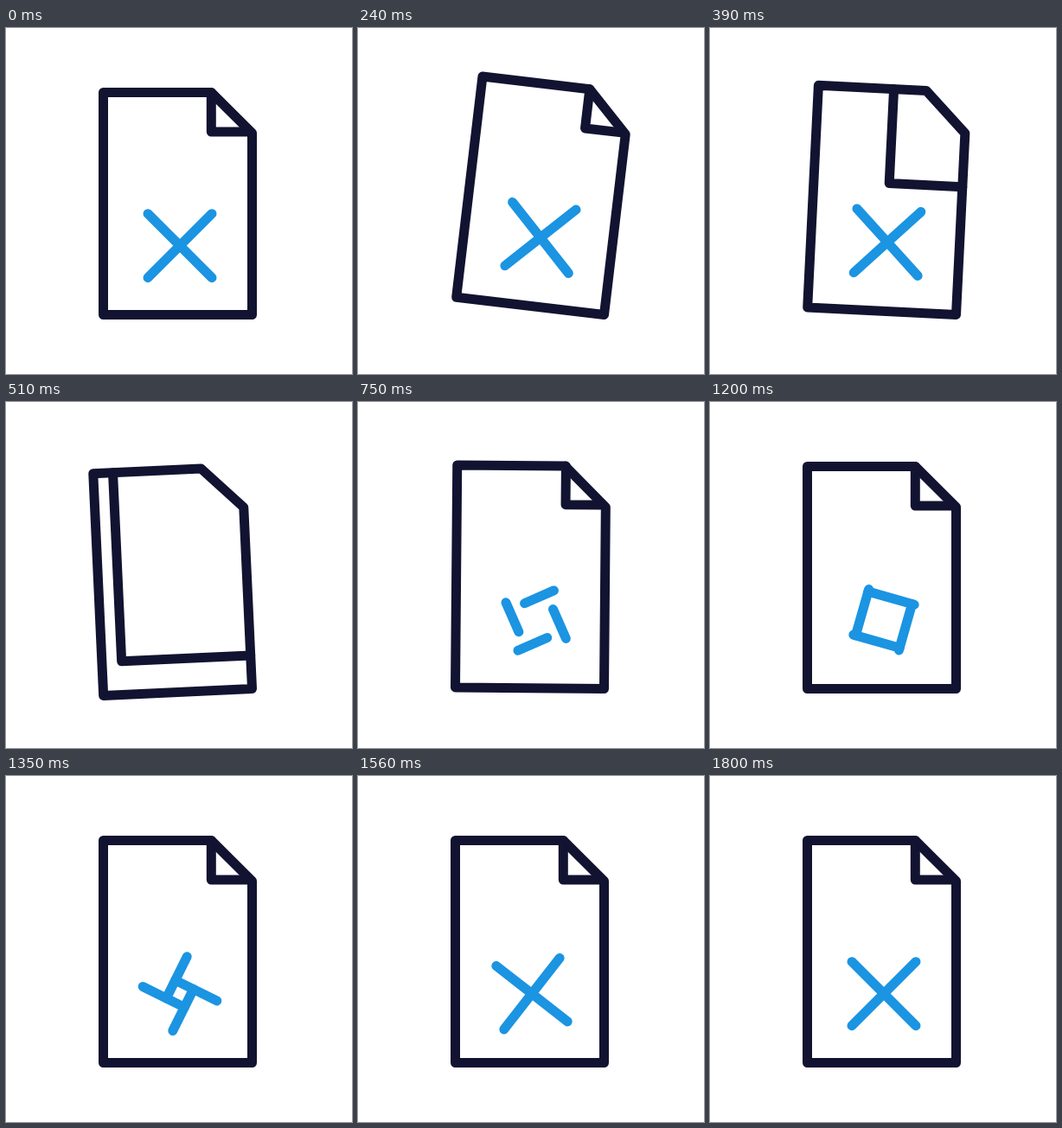
An HTML page with a canvas for the animation above (2.46 s loop, 400 px wide and 400 px high).

```html
<!DOCTYPE html>
<html>
<head>
<meta charset="utf-8">
<style>
html, body { margin: 0; width: 100%; height: 100%; overflow: hidden; background: #fff; }
canvas { display: block; width: 400px; height: 400px; }
</style>
</head>
<body>
<canvas id="stage" width="400" height="400"></canvas>
<script>
const ctx = document.getElementById('stage').getContext('2d');
const LOOP = 2460, STEP = 30, LAST = 60;
const DARK = '#121331', BLUE = '#1b94e2';
const L = 112.5, T = 74.5, R = 284.5, B = 331.5;   // page edges
const CUT_X = 237.3, CUT_Y = 121.5, FOLD_Y = 120;  // cut corner
const CX = 201, CY = 251.7, ARM = 52.3;

const clamp = v => Math.max(0, Math.min(1, v));
const smooth = v => { v = clamp(v); return v * v * (3 - 2 * v); };
const mix = (a, b, k) => a + (b - a) * k;

// Eased value list at step s; each key is [step, ...values]
function track(keys, s) {
  if (s <= keys[0][0]) return keys[0].slice(1);
  for (let i = 1; i < keys.length; i++) {
    const a = keys[i - 1], b = keys[i];
    if (s <= b[0]) {
      const k = smooth((s - a[0]) / (b[0] - a[0]));
      return a.slice(1).map((v, j) => mix(v, b[j + 1], k));
    }
  }
  return keys[keys.length - 1].slice(1);
}

const TILT = [[0, 0], [9, 7], [18, -3], [29, 2], [40, 0]];
// distance from centre, tail, head, drift x, drift y
const BARS = [
  [19, 22, 34, 34, 5, 2],
  [25, 23.4, -4, 33, 4, 1.6],
  [32, 27, -27, 28.5, 1, 0.4],
  [39, 27, -27, 28.5, 0, 0],
  [50, 0, 0, ARM, 0, 0]
];

function path(points, closed) {
  ctx.beginPath();
  points.forEach(p => ctx.lineTo(p[0], p[1]));
  if (closed) ctx.closePath();
}

function stroke(points, color, closed) {
  path(points, closed);
  ctx.strokeStyle = color;
  ctx.stroke();
}

function fold(x, y) {
  path([[CUT_X, T], [x, T], [x, y], [R, y], [R, CUT_Y]], true);
  ctx.fillStyle = '#fff';
  ctx.fill();
  stroke([[x, T], [x, y], [R - (y > CUT_Y ? 0 : 5), y]], DARK);
}

// Four bars turning around the centre
function bars(angle, dist, tail, head, dx, dy) {
  ctx.save();
  ctx.translate(CX + dx, CY + dy);
  ctx.rotate(angle * Math.PI / 180);
  for (let i = 0; i < 4; i++) {
    stroke([[tail, -dist], [head, -dist]], BLUE);
    ctx.rotate(Math.PI / 2);
  }
  ctx.restore();
}

function draw(s) {
  ctx.fillStyle = '#fff';
  ctx.fillRect(0, 0, 400, 400);
  ctx.lineWidth = 11;
  ctx.lineCap = ctx.lineJoin = 'round';
  ctx.save();
  ctx.translate(R, B);
  ctx.rotate(track(TILT, s)[0] * Math.PI / 180);
  ctx.translate(-R, -B);

  if (s < 20) {
    bars(45, 0, 0, ARM, 0, 0);
    const p = smooth((s - 9) / 11);
    fold(mix(CUT_X, L, p), mix(FOLD_Y, B, p));
  } else {
    bars(45 - 0.28 * Math.pow(LAST - s, 1.55), ...track(BARS, s));
    const p = 1 - Math.pow(1 - clamp((s - 19.5) / 7.5), 3);
    fold(mix(R, CUT_X, p), mix(T, FOLD_Y, p));
  }

  // keep the cut corner clean while the fold is still small
  path([[CUT_X, T], [R + 12, T - 12], [R, CUT_Y]], true);
  ctx.fillStyle = '#fff';
  ctx.fill();
  stroke([[L, T], [CUT_X, T], [R, CUT_Y], [R, B], [L, B]], DARK, true);
  ctx.restore();
}

const start = performance.now();
function tick() {
  const t = (performance.now() - start) % LOOP;
  draw(Math.min(LAST, Math.floor(t / STEP)));
  requestAnimationFrame(tick);
}
tick();
</script>
</body>
</html>
```
